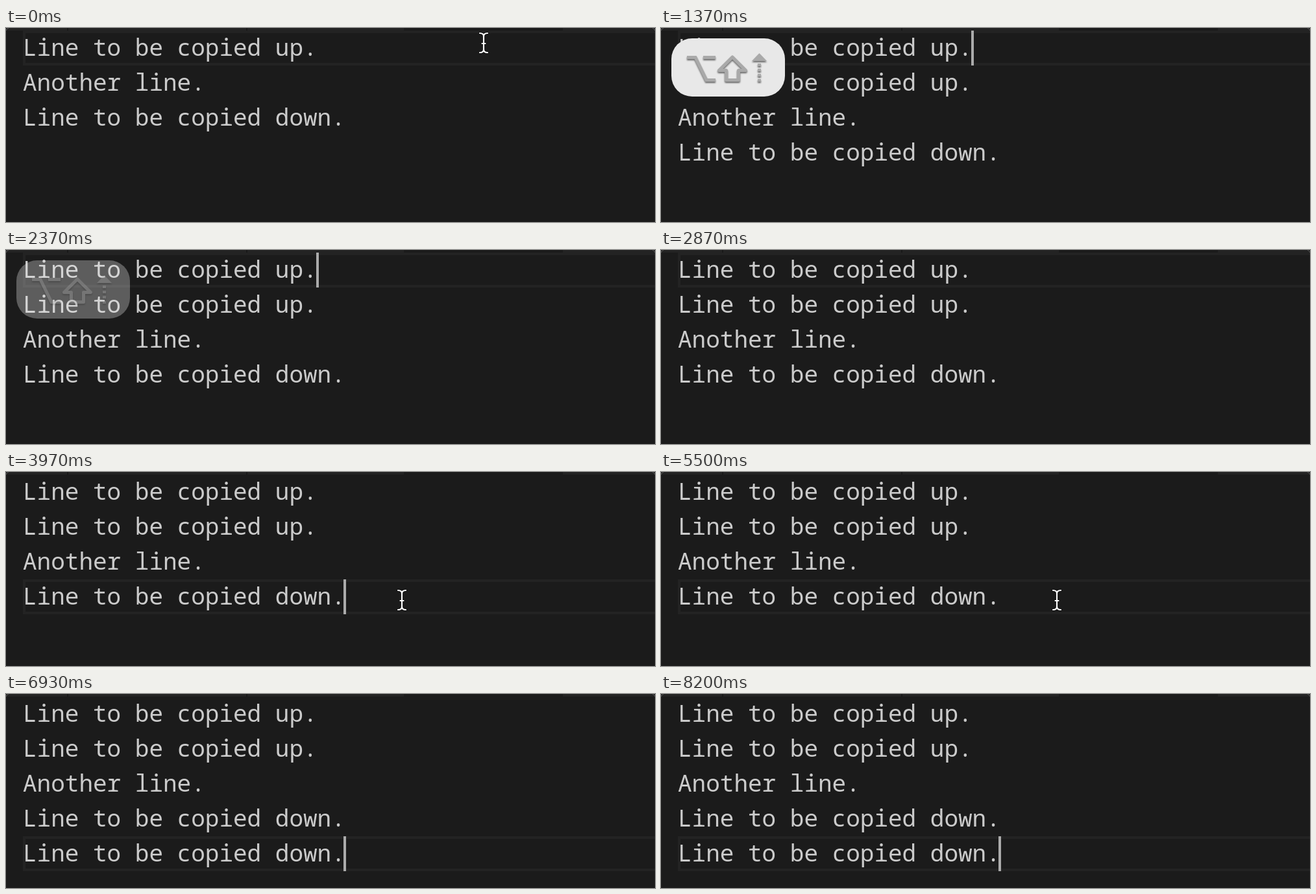
Animation of 1000 by 300 pixels, one loop 8230 ms. Source, as an HTML page:

```html
<!DOCTYPE html>
<html lang="en">
<head>
<meta charset="utf-8">
<title>Copying lines up and down</title>
<style>
  html, body { margin: 0; width: 100%; height: 100%; overflow: hidden; background: #1b1b1b; }
  svg { display: block; width: 100%; height: 100%; }
  text { font: 36px "Noto Sans Mono", "DejaVu Sans Mono", monospace; fill: #cbcbcb; white-space: pre; }
  #glyphs { filter: drop-shadow(0 2px 1px rgba(0, 0, 0, .55)); }
  .icon { fill: none; stroke: #a9a9a9; stroke-width: 5; }
</style>
</head>
<body>
<svg viewBox="0 0 1000 300">
  <defs>
    <path id="beam" d="M-6-15Q0-15 0-10Q0-15 6-15M0-10V10M-6 15Q0 15 0 10Q0 15 6 15M-2.500 1H2.500"/>
  </defs>
  <rect width="1000" height="300" fill="#1b1b1b"/>
  <!-- tab strip -->
  <path d="M0 0H613V4H0zM858 0H1000V4H858z" fill="#232323"/>
  <path d="M95 0V4M371 0V4" stroke="#181818" stroke-width="2"/>
  <path d="M0 4Q1 1 4 0M996 0Q999 1 1000 4" fill="none" stroke="#555"/>

  <rect id="row" x="28" width="990" height="50" fill="none" stroke="#232323" stroke-width="4"/>
  <g id="lines"></g>
  <rect id="caret" width="4" height="54" fill="#ababab"/>

  <rect id="plate" x="16" y="16" width="175" height="90" rx="32" fill="#e8e8e8"/>
  <g id="glyphs">
    <path class="icon" d="M40 45.500H53L70 80.500H84M65 45.500H84"/>
    <path class="icon" stroke-linejoin="round" d="M110 45L130.500 65.500H119.500V80.500H100.500V65.500H89.500Z"/>
    <g id="arrow">
      <path d="M151.500 39L163 51H140Z" fill="#a9a9a9"/>
      <path class="icon" d="M151.500 55V84" stroke-dasharray="4 4"/>
    </g>
  </g>

  <g id="mouse" fill="none" stroke-linecap="round">
    <use href="#beam" stroke="#111" stroke-width="4"/>
    <use href="#beam" stroke="#fff" stroke-width="2.200"/>
  </g>
</svg>
<script>
const LOOP = 8230, COPY_UP = 1370, CLICK = 3930, COPY_DOWN = 5830;
const HOLD = 865, FADE = 200, PITCH = 54;
const UP = "Line to be copied up.", MID = "Another line.", DOWN = "Line to be copied down.";
const $ = id => document.getElementById(id);

// Pointer strokes: [time, x, y]; the last point stays until `end`.
const strokes = [
  { end: COPY_UP, points: [[0, 736, 23]] },
  { end: COPY_DOWN, points: [[3570, 716, 40], [3720, 660, 125], [3870, 610, 198]] },
  { end: 8200, points: [[7600, 601, 195], [7950, 580, 140], [8130, 557, 67], [8170, 610, 29]] }
];

const rows = Array.from({ length: 5 }, (_, i) => {
  const el = document.createElementNS("http://www.w3.org/2000/svg", "text");
  el.setAttribute("x", 26);
  el.setAttribute("y", 42.5 + PITCH * i);
  return $("lines").appendChild(el);
});

const show = (el, on) => el.setAttribute("visibility", on ? "visible" : "hidden");

function pointerAt(t) {
  const stroke = strokes.find(s => t >= s.points[0][0] && t < s.end);
  if (!stroke) return null;
  const p = stroke.points;
  const next = p.findIndex(q => q[0] > t);
  if (next < 0) return p[p.length - 1].slice(1);
  const [t0, x0, y0] = p[next - 1], [t1, x1, y1] = p[next];
  const k = (t - t0) / (t1 - t0);
  return [x0 + (x1 - x0) * k, y0 + (y1 - y0) * k];
}

function keyOpacity(t) {
  const age = t - (t < COPY_DOWN ? COPY_UP : COPY_DOWN);
  return age < 0 ? 0 : Math.max(0, Math.min(1, 1 - (age - HOLD) / FADE));
}

function draw(t) {
  const lines = [UP, MID, DOWN];
  if (t >= COPY_UP) lines.unshift(UP);
  if (t >= COPY_DOWN) lines.push(DOWN);
  rows.forEach((el, i) => {
    const text = lines[i] || "";
    if (el.textContent !== text) el.textContent = text;
  });

  const row = t < CLICK ? 0 : t < COPY_DOWN ? 3 : 4;
  const top = 4 + PITCH * row;
  $("row").setAttribute("y", top + 2);
  $("caret").setAttribute("x", row ? 520 : 478);
  $("caret").setAttribute("y", top);

  // Every edit or click restarts the blink.
  const reset = [COPY_DOWN, CLICK, COPY_UP, -730].find(s => t >= s);
  show($("caret"), (t - reset) % 1000 < 500);

  // Plate and glyphs fade as separate layers.
  const opacity = keyOpacity(t);
  $("plate").setAttribute("opacity", opacity);
  $("glyphs").setAttribute("opacity", opacity);
  $("arrow").setAttribute("transform", t < COPY_DOWN ? "" : "matrix(1 0 0 -1 0 122)");

  const at = pointerAt(t);
  show($("mouse"), at);
  if (at) $("mouse").setAttribute("transform", `translate(${at})`);
}

const start = performance.now();
function tick() {
  draw((performance.now() - start) % LOOP);
  requestAnimationFrame(tick);
}
tick();
</script>
</body>
</html>
```
